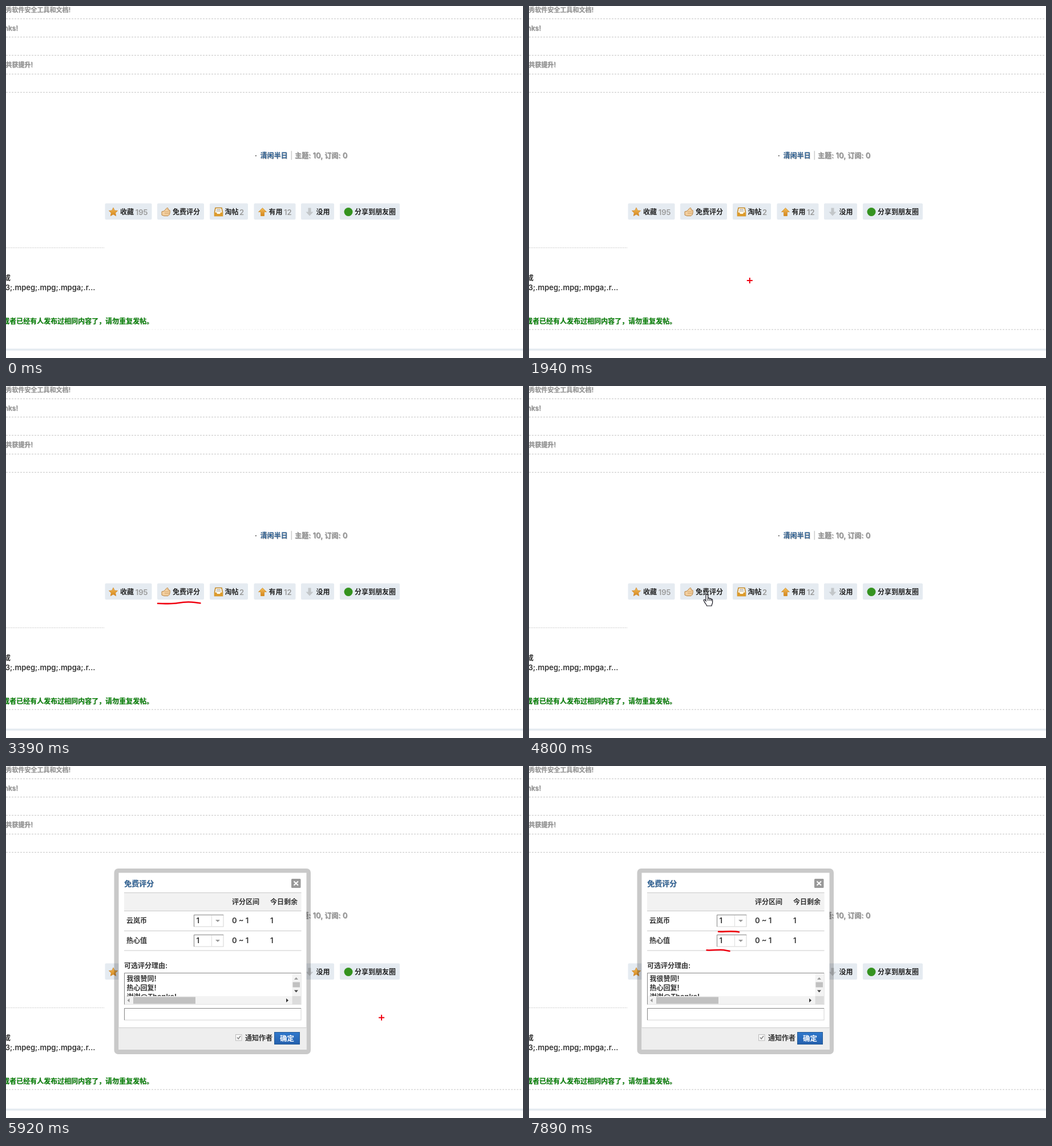
An HTML page that plays this animation: 906x618 px, repeating every 8000 ms.

```html
<!DOCTYPE html>
<html lang="zh-CN">
<head>
<meta charset="utf-8">
<title>免费评分</title>
<style>
html, body { margin: 0; width: 100%; height: 100%; overflow: hidden; background: #fff; }
svg { display: block; width: 906px; height: 618px; }
text { font: 600 12px Inter, "Noto Sans CJK SC", "Noto Sans CJK", sans-serif; fill: #333; white-space: pre; }
.soft { text-shadow: .7px .7px .6px rgba(0, 0, 0, .35); }
.ink { fill: none; stroke: #f00010; stroke-width: 2.6; stroke-linecap: round; stroke-linejoin: round; }
</style>
</head>
<body>
<svg viewBox="0 0 906 618" xmlns="http://www.w3.org/2000/svg">
  <defs>
    <linearGradient id="gold" x2="0" y2="1"><stop stop-color="#f3bd58"/><stop offset="1" stop-color="#d5851c"/></linearGradient>
    <linearGradient id="blue" x2="0" y2="1"><stop stop-color="#2f78cc"/><stop offset="1" stop-color="#2460ad"/></linearGradient>
    <clipPath id="list-tall"><rect x="208" y="364" width="293" height="237"/></clipPath>
    <clipPath id="list-short"><rect x="208" y="364" width="293" height="40"/></clipPath>
  </defs>
  <g id="page"></g>
  <g id="tall"></g>
  <g id="short"></g>
  <path class="ink" id="ink0" pathLength="1" d="M266 381.7C279 382 291 383 301 381C312 379 324 379 331 380L340.5 381.2"/>
  <path class="ink" id="ink1" pathLength="1" d="M332 290.8C342 291.4 356 289 368 291.5"/>
  <path class="ink" id="ink2" pathLength="1" d="M311.5 323.3C321 324 333 322 341 323L351.5 325"/>
  <path id="cross" d="M-5 0H5M0-5V5" stroke="#f00010" stroke-width="2"/>
  <path id="arrow" d="M0 0V16L4 12.5L6.5 18.5L9 17.5L6.5 11.8H11.5Z" fill="#fff" stroke="#111"/>
  <path id="hand" d="M-2 1.5C-2-.6 1.6-.6 1.6 1.5V7C2.4 5.8 4.6 6 4.8 7.6C5.6 6.6 7.4 7 7.5 8.4C8.5 7.8 9.6 8.6 9.6 9.8V14C9.6 16.5 8 17.5 8 20H-.5C-.8 17.8-2.6 16.4-4.2 13.6L-5.8 10.6C-6.2 9-4.2 8.4-3.2 9.8L-2 11.4ZM1.6 7V11M4.8 7.6V11M7.5 8.4V11.5" fill="#fff" stroke="#15151f" stroke-width="1.2"/>
  <path id="wedge" d="M523.5 440.5Q532 441 536 447.5Q531 454.5 523.5 455.5Q526 448 523.5 440.5Z" fill="#dc2230" stroke="#a06060"/>
</svg>
<script>
const LOOP = 8000;
const el = id => document.getElementById(id);

// Latin runs are set one pixel larger than the Chinese text around them.
function text(x, y, str, { fill = '#333', size = 12, end = false, soft = false } = {}) {
  const runs = str.split(/([ -~]+)/).map((run, i) =>
    i % 2 ? `<tspan style="font-size:${size + 1}px">${run}</tspan>` : run).join('');
  return `<text x="${x}" y="${y}" class="${soft ? 'soft' : ''}" text-anchor="${end ? 'end' : 'start'}"` +
    ` style="fill:${fill};font-size:${size}px">${runs}</text>`;
}
const rect = (x, y, r, b, fill, extra = '') =>
  `<rect x="${x}" y="${y}" width="${r - x}" height="${b - y}" fill="${fill}" ${extra}/>`;
const path = (d, fill, extra = '') => `<path d="${d}" fill="${fill}" ${extra}/>`;
const line = (x, y, r, color, dash = 'none', id = '') =>
  `<path ${id && `id="${id}"`} d="M${x} ${y}H${r}" stroke="${color}" stroke-dasharray="${dash}"/>`;
const field = (x, y, r, b) => rect(x, y, r, b, '#fff', 'stroke="#d4d4d4"') +
  path(`M${x} ${b}V${y}H${r}`, 'none', 'stroke="#858585"');

function star(cx, cy, r) {
  const pts = Array.from({ length: 10 }, (_, i) => {
    const a = i * Math.PI / 5 - Math.PI / 2, d = i % 2 ? r * .48 : r;
    return `${(cx + d * Math.cos(a)).toFixed(1)},${(cy + d * Math.sin(a)).toFixed(1)}`;
  });
  return `<polygon points="${pts.join(' ')}" fill="url(#gold)" stroke="#d08a30" stroke-width=".8" stroke-linejoin="round"/>`;
}

function page() {
  const gray = { fill: '#999', soft: true };
  const small = { ...gray, size: 11, end: true };
  const buttons = [
    [173.5, 255.5, 200, '收藏', '195', 248.5], [265, 347, 292, '免费评分'],
    [357, 424, 383.5, '淘帖', '2', 417], [434.5, 507.5, 460.5, '有用', '12', 500.5],
    [517, 575, 543.5, '没用'], [585, 690, 611, '分享到朋友圈']
  ];
  return [22.5, 54.5, 86.5, 119.5, 151.5].map(y => line(0, y, 904, '#c6c6c6', '3 2')).join('') +
    text(113, 10.5, '秀软件安全工具和文档!', small) +
    text(21, 43, 'nks!', small) +
    text(47, 107, '共获提升!', small) +
    text(436, 267, '·') +
    text(445.5, 267, '清闲半日', { fill: '#336699', soft: true }) +
    text(498, 267, '|', { fill: '#ccc' }) +
    text(506, 267, '主题: 10, 订阅: 0', gray) +
    buttons.map(([x, r, tx, label, count, cx]) =>
      rect(x, 346.5, r, 375, '#e5ebf1', 'rx="2"') + text(tx, 366, label, { fill: '#222' }) +
      (count ? text(cx, 366.5, count, { fill: '#999', end: true }) : '')).join('') +
    star(188, 362, 8) +
    path('M273 361L277 360L282 354.5Q285 354 284 358L287 358.5Q288 361 286.5 366L284 368.5H277L273 367Z', '#f3cf9f', 'stroke="#b98546"') +
    path('M278 361.5H286M278 364.5H286', 'none', 'stroke="#c79558" stroke-width=".7"') +
    path('M367 354.5H378L379.5 362V368.5H365.5V362Z', '#fff8e8', 'stroke="#c08522" stroke-width="1.5"') +
    path('M365 362.5H369L370 365H375L376 362.5H380V369H365Z', '#dc9b2c') +
    path('M369 357.5H376M368.5 360H376.5', 'none', 'stroke="#999"') +
    path('M449.5 354.5L456.5 361.5H452.5V368.5H446.5V361.5H442.5Z', 'url(#gold)', 'stroke="#cf8a20" stroke-width=".7"') +
    path('M532 368.5L525.5 361.5H529.5V354.5H534.5V361.5H538.5Z', '#c2c6c9') +
    '<circle cx="600" cy="361.5" r="7.5" fill="#359320"/>' +
    line(0, 424.5, 172, '#c4c4c4', '1.5 1.5') +
    text(-4, 482, '成') +
    text(156.5, 499, 'p3;.mpeg;.mpg;.mpga;.r...', { end: true }) +
    text(-6, 557.5, '或者已经有人发布过相同内容了，请勿重复发帖。', { fill: '#0a850a', soft: true }) +
    line(0, 568, 904, '#c6c6c6', '3 2', 'rule') +
    rect(0, 601.5, 906, 605, '#e5ebf1');
}

const REASONS = ['我很赞同!', '热心回复!', '谢谢@Thanks!', '用心讨论，共获提升!',
  '鼓励转贴优秀软件安全工具和文档!', '已经处理，感谢您对云岚拾码论坛的支持!',
  '欢迎分析讨论交流，云岚拾码论坛有你更精彩!', '感谢发布原创作品，云岚拾码论坛因你更精彩!',
  '感谢您的宝贵建议，我们会努力争取做得更好!', '--------', '广告贴，请遵守论坛版规!',
  '此为违规行为，请遵守论坛版规!', '请勿灌水，提高回帖质量是每位会员应尽的义务!',
  '未能按照本版块发帖要求发帖，请仔细阅读本版块版规再发', '论坛禁止求脱求破，求助软件分析思路，务必在主题帖中'];

function dialog(short) {
  const value = short ? '1' : '0';
  const bar = short ? 404 : 602;
  const listEnd = short ? 418.5 : 640;
  const row = (y, label) =>
    text(211, y + 4.5, label) + field(329.5, y - 10, 381, y + 10.5) +
    path(`M360.5 ${y - 9}V${y + 10}`, 'none', 'stroke="#ddd"') +
    path(`M367 ${y - 1.5}H375L371 ${y + 2.5}Z`, '#999') +
    text(333.5, y + 4.8, value) + text(396, y + 4.8, '0 ~ 1') + text(463, y + 4.8, '1');

  return rect(189.5, 180, 534, short ? 506 : 640, '#000', 'rx="7" opacity=".21"') +
    rect(197.5, 187.5, 526.5, short ? 498 : 640, '#fff') +
    text(207, 210.5, '免费评分', { fill: '#336699', size: 13, soft: true }) +
    rect(500, 198, 516.5, 214, '#999', 'rx="1.5"') +
    path('M504.5 202.5L512 209.5M512 202.5L504.5 209.5', 'none', 'stroke="#fff" stroke-width="2"') +
    rect(207, 223, 517.5, 254, '#f2f2f2') +
    [222.5, 254.5, 289.5, 324].map(y => line(207, y, 517.5, '#c9c9c9')).join('') +
    text(396, 243, '评分区间') + text(463, 243, '今日剩余') +
    row(271.5, '云岚币') + row(306.5, '热心值') +
    (short ? '' : path('M333.5 264V280', 'none', 'stroke="#222"')) +
    text(207, 354.5, '可选评分理由:') +
    field(207.5, 363.5, 517, listEnd) +
    `<g clip-path="url(#list-${short ? 'short' : 'tall'})">` +
    REASONS.map((s, i) => text(211.5, 378.3 + i * 15.64, s)).join('') + '</g>' +
    rect(501.5, 364.5, 516.5, bar, '#f3f3f3') +
    path('M505 375H512L508.5 371Z', '#999') +
    path(`M505 ${bar - 10.5}H512L508.5 ${bar - 6.5}Z`, short ? '#444' : '#999') +
    (short ? rect(502.5, 379.5, 515, 388.5, '#c1c1c1') : '') +
    rect(208, bar, 501.5, bar + 14.5, '#f3f3f3') +
    rect(501.5, bar, 516.5, bar + 15, '#dcdcdc') +
    rect(223, bar + 1.5, 332, bar + 13.5, '#c1c1c1') +
    path(`M216.5 ${bar + 4}V${bar + 11}L212.5 ${bar + 7.5}Z`, '#999') +
    path(`M491 ${bar + 4}V${bar + 11}L495 ${bar + 7.5}Z`, '#333') +
    (short
      ? field(207.5, 425.5, 517, 446) +
        rect(197.5, 459, 526.5, 498, '#eee') + line(197.5, 459.5, 526.5, '#ccc') +
        rect(402.5, 471.5, 413, 482, '#f8f8f8', 'stroke="#bbb"') +
        path('M405 476.5L407.2 479L411 474', 'none', 'stroke="#888" stroke-width="1.6"') +
        text(419, 481.5, '通知作者') +
        rect(470.5, 467.5, 514.5, 488.5, 'url(#blue)', 'stroke="#235994"') +
        text(480, 482.5, '确定', { fill: '#fff', size: 12.5 })
      : '');
}

el('page').innerHTML = page();
el('tall').innerHTML = dialog(false);
el('short').innerHTML = dialog(true);

// Pointer tracks: [time, x, y]
const CROSS = [
  [[390, 610, 616], [800, 520, 555], [1190, 444, 512], [1260, 439, 509], [1700, 408, 493], [1940, 387, 482],
    [2040, 364, 468], [2320, 290, 400], [2430, 260, 374], [2500, 266, 381.7]],
  [[3500, 342, 383], [3580, 360, 420], [3680, 410, 501], [3750, 410, 501]],
  [[5340, 594, 459], [5460, 594, 459], [5850, 650, 446], [6260, 697, 421], [6400, 655, 400], [6650, 480, 338],
    [6930, 344, 298], [7060, 331.5, 291], [7090, 332, 290.8]],
  [[7340, 368, 291.5], [7430, 340, 305], [7520, 306, 322], [7560, 311.5, 323.3]]
];
const ARROW = [
  [[3750, 410, 501], [4000, 385, 460], [4300, 330, 392], [4420, 314, 376]],
  [[5060, 312, 366], [5300, 524, 441]]
];
const HAND = [[[4420, 314, 373], [4520, 312, 366], [5060, 312, 366]]];
const INK = [
  { path: el('ink0'), start: 2500, end: 3000, clear: 3750 },
  { path: el('ink1'), start: 7090, end: 7340, clear: LOOP },
  { path: el('ink2'), start: 7560, end: 7860, clear: LOOP }
];

function along(tracks, t) {
  const track = tracks.find(k => t >= k[0][0] && t < k[k.length - 1][0]);
  if (!track) return null;
  const i = track.findIndex(k => k[0] > t);
  const [t0, x0, y0] = track[i - 1], [t1, x1, y1] = track[i];
  const p = (t - t0) / (t1 - t0);
  return { x: x0 + (x1 - x0) * p, y: y0 + (y1 - y0) * p };
}
const show = (node, on) => { node.style.display = on ? '' : 'none'; };
function place(id, pos) {
  show(el(id), pos);
  if (pos) el(id).setAttribute('transform', `translate(${pos.x.toFixed(1)} ${pos.y.toFixed(1)})`);
}

function draw(t) {
  let cross = along(CROSS, t);
  for (const { path, start, end, clear } of INK) {
    const p = Math.min(1, (t - start) / (end - start));
    show(path, p > 0 && t < clear);
    path.style.strokeDasharray = p < 1 ? `${Math.max(0, p)} 2` : 'none';
    if (p > 0 && p < 1) cross = path.getPointAtLength(p * path.getTotalLength());
  }
  place('cross', cross);
  place('arrow', along(ARROW, t));
  place('hand', along(HAND, t));
  show(el('wedge'), t >= 5300 && t < 5340);
  show(el('tall'), t >= 5060 && t < 5340);
  show(el('short'), t >= 5340);
  el('rule').style.opacity = t < 700 || (t >= 5060 && t < 5340) ? .25 : 1;
}

const begin = performance.now();
function tick() {
  draw((performance.now() - begin) % LOOP);
  requestAnimationFrame(tick);
}
tick();
</script>
</body>
</html>
```
